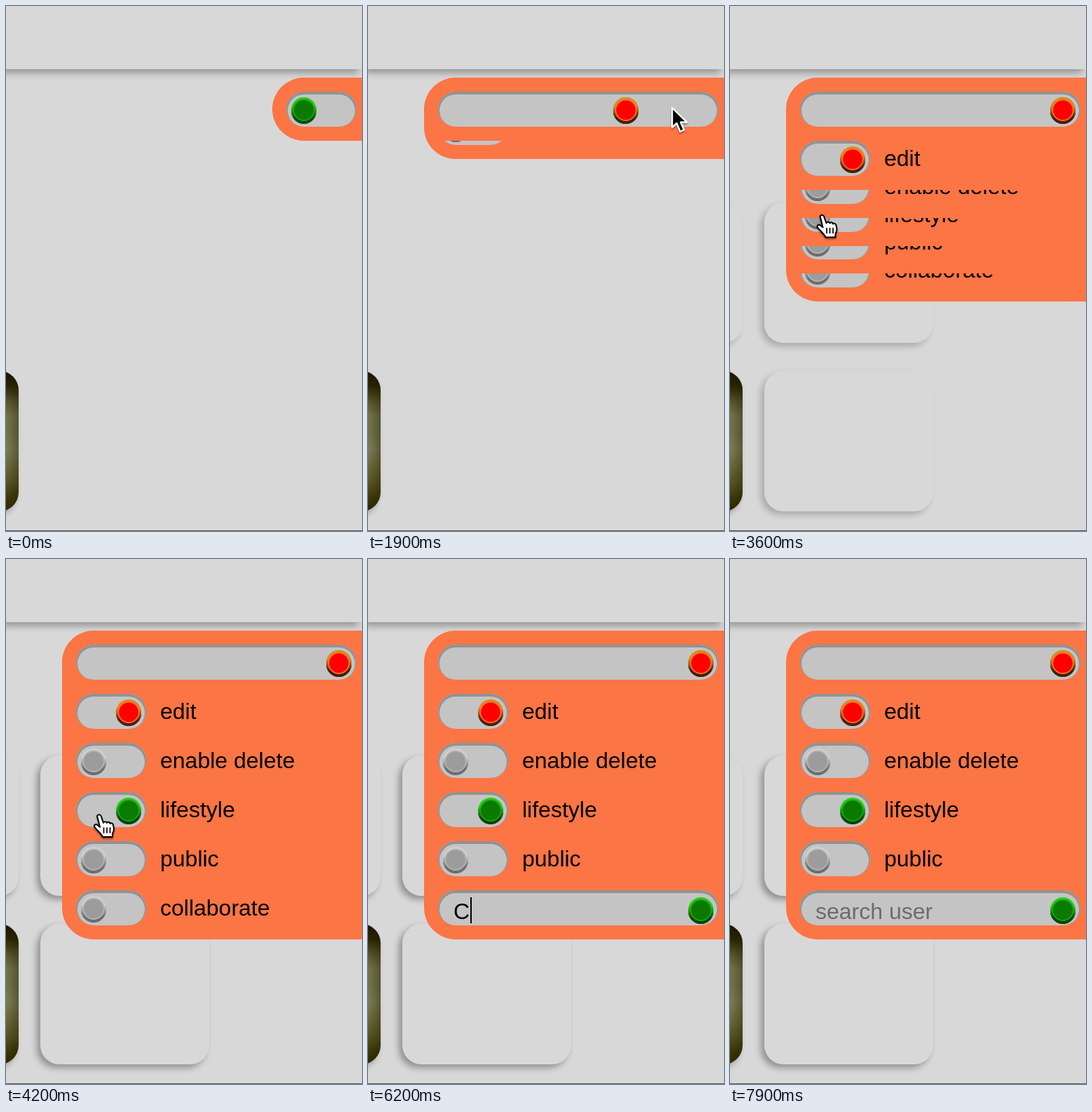
An HTML page for the animation above (8000 ms loop, 508 by 748 pixels).

```html
<!DOCTYPE html>
<html lang="en">
<head>
<meta charset="utf-8">
<title>Settings panel</title>
<style>
  html, body { margin: 0; width: 100%; height: 100%; overflow: hidden; background: #d8d8d8; }
  #stage {
    position: relative; width: 508px; height: 748px; overflow: hidden;
    background: #d8d8d8; color: #000;
    font: 32px/50px "Liberation Sans", Arial, sans-serif; white-space: nowrap;
  }
  #stage * { box-sizing: border-box; }
  #stage div, #stage span, #stage i { position: absolute; }

  .header, .card { background: #d8d8d8; box-shadow: -5px 5px 10px rgba(0, 0, 0, .33); }
  .header { left: 0; top: 0; width: 508px; height: 90px; }
  .floor { left: 0; bottom: 0; width: 100%; height: 1px; background: #555; }
  .card { width: 241px; height: 200px; border-radius: 27px; }
  .slots { inset: 0; opacity: var(--cards); }
  .photo {
    left: -223px; top: 520px;
    background:
      linear-gradient(90deg, transparent 225px, rgba(30, 25, 0, .35)),
      linear-gradient(#1b1300, #2c2503 11%, #57562b 22%, #73734a 32%, #72724a 44%,
        #7b7b54 56%, #6a693a 68%, #565321 80%, #3d3909 90%, #2c2600);
  }

  .panel {
    right: 0; top: 102px; overflow: hidden;
    width: calc(128px + 300px * var(--open));
    height: calc(90px + 70px * var(--first) + 280px * var(--rest) + 52px * var(--drop));
    border-radius: 45px 0 0 45px; background: #fb7545;
  }
  #stage .panel > .row { position: relative; left: 20px; width: 400px; overflow: hidden; height: calc(70px * var(--show) + var(--more, 0px)); }
  #stage .panel > .main { height: 70px; margin-top: 20px; }
  .inner { left: 0; bottom: 0; width: 400px; height: calc(70px + var(--more, 0px)); }
  .track {
    left: 0; top: 0; bottom: 20px; overflow: hidden;
    width: calc(100px + 300px * var(--wide, 0));
    border-radius: 25px; background: #c4c4c4;
    box-shadow: inset 0 2px 0 2px #929292;
  }
  .label { left: calc(120px + 300px * var(--wide, 0)); top: 0; }

  .knob { top: 8px; left: calc(7px + var(--travel, 50px) * var(--on)); width: 36px; height: 36px; }
  .lamp {
    inset: 0; border-radius: 50%; box-shadow: 0 2px 0 var(--dark);
    background:
      radial-gradient(circle at 50% 51%, var(--core) 13.3px, var(--rim) 14.2px 15.2px, transparent 16px),
      linear-gradient(var(--glow) 35%, var(--dark) 82%);
  }
  .gray  { --core: #9c9c9c; --rim: #b2b2b2; --glow: #d0d0d0; --dark: #686868; }
  .red   { --core: #ff0000; --rim: #fb6a30; --glow: #dc8c1e; --dark: #4a1c08; }
  .green { --core: #0b7a00; --rim: #17a30f; --glow: #26cf18; --dark: #054200; }
  .lit { opacity: var(--hue, var(--on)); }

  .collab .knob { top: calc(8px + var(--sink)); }
  .field { left: 22px; top: calc(3px + var(--sink)); height: 47px; overflow: hidden; width: max(0px, -50px + 300px * var(--wide)); }
  .hint { left: 0; top: 0; color: #6c6c6c; }
  .caret { top: 5px; width: 2px; height: 37px; background: #000; }
  .results { left: 6px; right: 6px; top: 54px; bottom: 0; overflow: hidden; }
  .result { left: 0; right: 0; bottom: 4px; height: 40px; border-radius: 20px; background: #9d9d9d; padding-left: 80px; line-height: 40px; }

  #cursor { position: absolute; left: 0; top: 0; overflow: visible; filter: drop-shadow(0 2px 1px rgba(0, 0, 0, .4)); }
  #cursor g { display: none; }
  #cursor g.on { display: inline; }
</style>
</head>
<body>
<div id="stage">
  <div class="header"></div>
  <div class="slots">
    <div class="card" style="left:-223px;top:280px"></div>
    <div class="card" style="left:49px;top:280px"></div>
    <div class="card" style="left:49px;top:520px"></div>
  </div>
  <div class="card photo"></div>
  <div class="floor"></div>
  <div class="panel" id="panel"></div>
  <svg id="cursor" width="1" height="1">
    <g id="arrow" stroke-linejoin="round">
      <path d="M1 2V30L7.5 24L12.5 36L18 33.5L13 22.5H22Z" fill="#000" stroke="#fff" stroke-width="2.4"/>
    </g>
    <g id="hand" stroke="#000" stroke-width="2" stroke-linejoin="round" stroke-linecap="round">
      <path d="M-2 2C-1 -.5 2.500 -.5 3.500 2L7 12C8 9.500 11 9.500 12 12C13 10 16 10.500 16.500 13C18 11.500 21 12.500 21 15.500C22.500 20 22 24 20 27V32H6C4 27 -1 24 -5.500 18C-7 15 -4 13 -1.500 15L2 18Z" fill="#fff"/>
      <path d="M7.500 19V26M12 19V26M16.500 19V26" fill="none" stroke-width="1.700"/>
    </g>
    <g id="beam" fill="none" stroke-linecap="round">
      <path id="stem" d="M-6 -14Q0 -14 0 -10Q0 -14 6 -14M0 -10V10M-6 14Q0 14 0 10Q0 14 6 14M-3 4H3" stroke="#fff" stroke-width="5.500"/>
      <use href="#stem" style="stroke:#000"/>
      <path d="M-6 -14Q0 -14 0 -10Q0 -14 6 -14M0 -10V10M-6 14Q0 14 0 10Q0 14 6 14M-3 4H3" stroke="#000" stroke-width="2.300"/>
    </g>
  </svg>
</div>
<script>
  const LOOP = 8000, TICK = 100;
  const $ = id => document.getElementById(id);

  const row = (name, vars, off, lit, label = '', extra = '') => `
    <div class="row ${name}" style="${vars}"><div class="inner">
      <div class="track">${extra}<div class="knob"><i class="lamp ${off}"></i><i class="lamp lit ${lit}"></i></div></div>
      <span class="label">${label}</span>
    </div></div>`;

  const search = `
    <div class="field" id="field"><span class="hint" id="hint">search user</span>
      <span id="typed">C</span><i class="caret" id="caret"></i></div>
    <div class="results"><div class="result">Cadry Fen</div></div>`;

  $('panel').innerHTML =
    row('main', '--show:1;--on:var(--slide);--wide:var(--open);--travel:350px;--hue:var(--alert)', 'green', 'red') +
    row('', '--show:var(--first);--on:var(--edit)', 'gray', 'red', 'edit') +
    row('', '--show:var(--rest);--on:0', 'gray', 'green', 'enable delete') +
    row('', '--show:var(--rest);--on:var(--life)', 'gray', 'green', 'lifestyle') +
    row('', '--show:var(--rest);--on:0', 'gray', 'green', 'public') +
    row('collab', '--show:var(--rest);--on:var(--team);--wide:var(--team);--travel:350px;--more:calc(52px * var(--drop))',
      'gray', 'green', 'collaborate', search);

  // name: start and end of its transition
  const moves = {
    open: [1350, 1800], slide: [1350, 2220], alert: [1350, 1750], first: [1740, 2130],
    edit: [3250, 3600], rest: [3300, 3850], cards: [3300, 3800],
    life: [3850, 4150], team: [4800, 5400]
  };
  // time, x, y of the pointer tip
  const path = [
    [200, 2, 648], [300, 148, 462], [500, 148, 462], [1300, 452, 146], [1500, 452, 146],
    [1800, 433, 143], [2300, 433, 143], [2800, 129, 231], [3400, 129, 231],
    [3800, 132, 364], [4200, 132, 364], [4700, 134, 496], [6000, 134, 496]
  ];

  const ramp = (t, a, b) => {
    const u = Math.min(1, Math.max(0, (t - a) / (b - a)));
    return u * u * (3 - 2 * u);
  };
  const within = (t, ...spans) => spans.some(([a, b]) => t >= a && t < b);

  function movePointer(t) {
    const seen = within(t, [200, 6000]);
    $('cursor').style.display = seen ? '' : 'none';
    if (!seen) return;
    const i = path.findIndex((p, n) => n && t < p[0]);
    const [a, x0, y0] = path[i - 1], [b, x1, y1] = path[i];
    const k = ramp(t, a, b);
    $('cursor').style.transform = `translate(${x0 + (x1 - x0) * k}px, ${y0 + (y1 - y0) * k}px)`;
    const shape = t >= 5000 ? 'beam' : within(t, [1300, 1600], [2700, 5000]) ? 'hand' : 'arrow';
    for (const id of ['arrow', 'hand', 'beam']) $(id).classList.toggle('on', id === shape);
  }

  function draw(t) {
    const style = $('stage').style;
    const set = (name, value) => style.setProperty('--' + name, value);
    for (const name in moves) set(name, ramp(t, ...moves[name]));
    set('drop', ramp(t, 6300, 6700) - ramp(t, 7550, 7900));
    set('sink', 2 * ramp(t, 5100, 5400) + 'px');

    const typed = within(t, [6000, 7600]);
    $('field').style.display = t >= 4900 ? '' : 'none';
    $('hint').style.display = typed ? 'none' : '';
    $('typed').style.display = typed ? '' : 'none';
    $('caret').style.left = typed ? '24px' : '0';
    $('caret').style.opacity = +within(t, [5000, 5500], [6000, 6800], [7200, 7800]);
    movePointer(t);
  }

  function loop() {
    const t = performance.now() % LOOP;
    draw(Math.floor(t / TICK) * TICK);
    requestAnimationFrame(loop);
  }
  loop();
</script>
</body>
</html>
```
